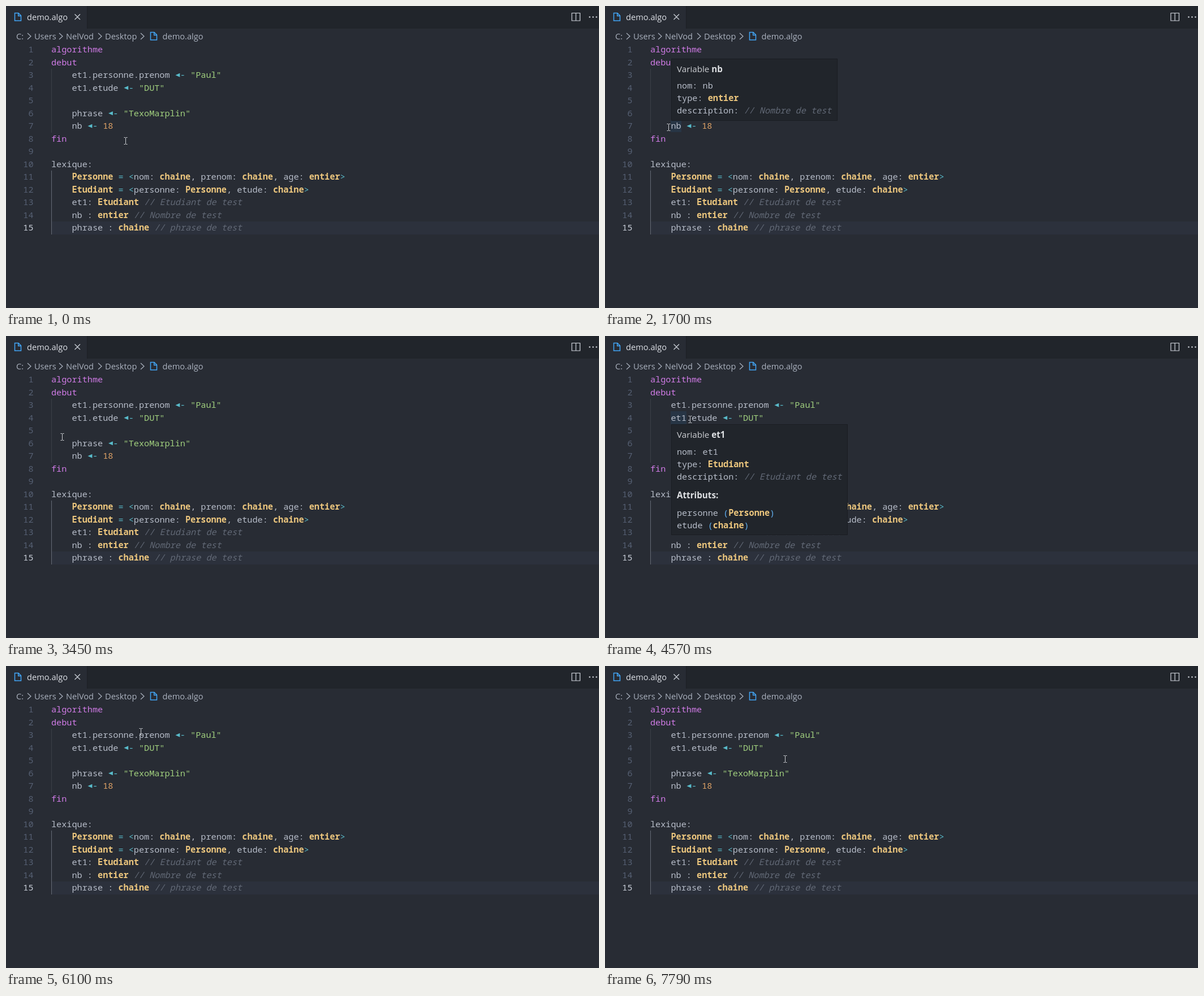
Animation of 1048x534 px, one loop 7.85 s. Source, as an HTML page:

```html
<!DOCTYPE html>
<html lang="fr">
<head>
<meta charset="utf-8">
<title>demo.algo</title>
<style>
html, body { margin: 0; width: 100%; height: 100%; overflow: hidden; background: #282c34; }
#stage {
  position: relative; width: 1048px; height: 534px; overflow: hidden; color: #b7bdc9;
  --mono: 500 15.19px "Noto Sans Mono", "DejaVu Sans Mono", monospace;
  --ui: "Open Sans", "Noto Sans", sans-serif;
  --loop: 7850ms step-end infinite;
}
#stage > * { position: absolute; }
pre { margin: 0; font: var(--mono); line-height: 22.5px; }
b { font-weight: 600; color: #edc77e; }
i { font-weight: 400; color: #626976; }
.k { color: #d07be6; }
.s { color: #a0cf7e; }
.n { color: #dfa266; }
.o { color: #59bccb; }
.p { color: #61afef; }
.arrow { color: #59bccb; }
.arrow::before {
  content: ""; display: inline-block; width: 9.1px; height: 7px; vertical-align: 1.5px;
  background: currentColor; clip-path: polygon(95% 0, 95% 100%, 8% 50%);
}

/* window chrome */
.tabs { left: 144px; top: 0; right: 0; height: 40px; background: #21252b; box-shadow: -1px 0 #1c1f25; }
.chrome { left: 0; top: 0; font: 14.6px var(--ui); fill: #abb2bf; }
.chrome .lit { fill: #dde0e6; }
.chrome g { fill: none; stroke: #d0d4dc; stroke-width: 1.2; }
.chrome .chevrons { stroke: #abb2bf; }
.chrome .file { stroke: #42a5f5; stroke-width: 1.5; }

/* editor */
.current { left: 80px; top: 381px; right: 0; height: 22.5px; background: #2c313c; }
.guide { left: 80px; width: 1px; height: 112.5px; top: 111px; background: #3b4048; }
.guide.active { top: 291px; background: #646a75; }
.numbers { left: 0; top: 65.3px; width: 48.6px; text-align: right; color: #566073; }
.numbers span { color: #c9ced8; }
.code { left: 80px; top: 65.3px; }
.word {
  left: calc(80px + 9.1px * var(--col)); top: calc(43.2px + 22.5px * var(--line));
  width: calc(9.1px * var(--len)); height: 22.5px; background: #273545;
}

/* hover cards */
.card {
  box-sizing: border-box; padding: 0 9px 6.5px; background: #21252b;
  border: 1px solid #1a1d22;
}
.card h4, .card h5 { margin: 0; font: 15.2px/34px var(--ui); color: #ccced2; white-space: pre; }
.card h4 { padding-bottom: 1.5px; }
.card h5 { line-height: 45px; margin-bottom: -3px; }
.card strong, .card h5 { font-weight: 700; color: #dfe1e4; }
.card pre { line-height: 22px; }

.nb { animation: nb var(--loop); }
.phrase { animation: phrase var(--loop); }
.et1 { animation: et1 var(--loop); }
.personne { animation: personne var(--loop); }
.prenom { animation: prenom var(--loop); }
@keyframes nb {
  0%, 24.968%, 100% { opacity: 0; } 7.898% { opacity: .6; } 8.662% { opacity: 1; }
}
@keyframes phrase {
  0%, 43.949%, 100% { opacity: 0; } 32.739% { opacity: .6; } 33.503% { opacity: 1; }
}
@keyframes et1 {
  0%, 61.529%, 100% { opacity: 0; } 50.955% { opacity: .6; } 51.72% { opacity: 1; }
}
@keyframes personne {
  0%, 77.707%, 100% { opacity: 0; } 67.006% { opacity: .6; } 67.898% { opacity: 1; }
}
@keyframes prenom {
  0%, 96.178%, 100% { opacity: 0; } 83.185% { opacity: .8; } 86.369% { opacity: 1; }
}

/* pointer: sampled moves between pauses */
.pointer { left: -3px; top: -6px; animation: pointer var(--loop); }
@keyframes pointer {
  0% { transform: translate(211px, 238px); }
  .892% { transform: translate(200px, 234px); animation-timing-function: steps(5); }
  4.777% { transform: translate(131px, 211px); }
  6.369% { transform: translate(129px, 211px); }
  15.159% { transform: translate(125px, 212px); }
  18.471% { transform: translate(119px, 213px); }
  21.656% { transform: translate(112px, 214px); }
  24.968% { transform: translate(104px, 208px); animation-timing-function: steps(3); }
  27.389% { transform: translate(108px, 196px); animation-timing-function: steps(3); }
  29.682% { transform: translate(136px, 190px); }
  37.325% { transform: translate(130px, 190px); }
  40.637% { transform: translate(106px, 184px); }
  43.949% { transform: translate(99px, 178px); animation-timing-function: steps(2); }
  45.478% { transform: translate(95px, 168px); animation-timing-function: steps(3); }
  47.898% { transform: translate(125px, 148px); }
  54.904% { transform: translate(135px, 148px); }
  58.217% { transform: translate(150px, 147px); }
  61.529% { transform: translate(168px, 140px); animation-timing-function: steps(3); }
  63.949% { transform: translate(188px, 129px); }
  67.898% { transform: translate(189px, 129px); }
  71.21% { transform: translate(213px, 121px); }
  74.522% { transform: translate(220px, 119px); }
  77.707% { transform: translate(238px, 116px); animation-timing-function: steps(2); }
  79.299% { transform: translate(265px, 122px); }
  89.682% { transform: translate(275px, 127px); }
  92.994% { transform: translate(299px, 144px); }
  96.178% { transform: translate(306px, 152px); animation-timing-function: steps(4); }
  99.236%, 100% { transform: translate(318px, 164px); }
}
</style>
</head>
<body>
<div id="stage">
  <div class="tabs"></div>
  <svg class="chrome" width="1048" height="66">
    <defs>
      <path id="file" d="M1 1H7.5L12 5.5V14.5H1ZM7.2 1.2V6H11.8"/>
      <path id="chevron" d="M0 0L6 5.5L0 11"/>
    </defs>
    <g class="file"><use href="#file" x="14.5" y="11.5"/><use href="#file" x="254.5" y="45.5"/></g>
    <g><path d="M121.5 14.5L131 24M131 14.5L121.5 24M1000 12.5H1014.5V26H1000ZM1007.2 12.5V26"/></g>
    <g class="chevrons">
      <use href="#chevron" x="38" y="48"/><use href="#chevron" x="94" y="48"/>
      <use href="#chevron" x="163" y="48"/><use href="#chevron" x="238" y="48"/>
    </g>
    <g stroke-linecap="round" style="stroke-width:2.6"><path d="M1031.5 19.5h.01M1037.5 19.5h.01M1043.5 19.5h.01"/></g>
    <text class="lit" x="37" y="24.5">demo.algo</text>
    <text x="18" y="59">C:</text>
    <text x="50" y="59">Users</text>
    <text x="106" y="59">NelVod</text>
    <text x="175" y="59">Desktop</text>
    <text x="276.5" y="59">demo.algo</text>
  </svg>

  <div class="current"></div>
  <div class="guide"></div>
  <div class="guide active"></div>
  <div class="word nb" style="--col:4; --len:2; --line:7"></div>
  <div class="word phrase" style="--col:4; --len:6; --line:6"></div>
  <div class="word et1" style="--col:4; --len:3; --line:4"></div>
  <div class="word personne" style="--col:8; --len:8; --line:3"></div>
  <div class="word prenom" style="--col:17; --len:6; --line:3"></div>

<pre class="numbers">1
2
3
4
5
6
7
8
9
10
11
12
13
14
<span>15</span></pre>
<pre class="code"><span class="k">algorithme</span>
<span class="k">debut</span>
    et1.personne.prenom <span class="arrow">-</span> <span class="s">"Paul"</span>
    et1.etude <span class="arrow">-</span> <span class="s">"DUT"</span>

    phrase <span class="arrow">-</span> <span class="s">"TexoMarplin"</span>
    nb <span class="arrow">-</span> <span class="n">18</span>
<span class="k">fin</span>

lexique:
    <b>Personne</b> <span class="o">=</span> <span class="o">&lt;</span>nom: <b>chaine</b>, prenom: <b>chaine</b>, age: <b>entier</b><span class="o">&gt;</span>
    <b>Etudiant</b> <span class="o">=</span> <span class="o">&lt;</span>personne: <b>Personne</b>, etude: <b>chaine</b><span class="o">&gt;</span>
    et1: <b>Etudiant</b> <i>// Etudiant de test</i>
    nb : <b>entier</b> <i>// Nombre de test</i>
    phrase : <b>chaine</b> <i>// phrase de test</i></pre>

  <div class="card nb" style="left:117px; top:92.5px; width:294px">
    <h4>Variable <strong>nb</strong></h4>
<pre>nom: nb
type: <b>entier</b>
description: <i>// Nombre de test</i></pre>
  </div>
  <div class="card phrase" style="left:117px; top:70px; width:294px">
    <h4>Variable <strong>phrase</strong></h4>
<pre>nom: phrase
type: <b>chaine</b>
description: <i>// phrase de test</i></pre>
  </div>
  <div class="card et1" style="left:117px; top:156px; width:312px">
    <h4>Variable <strong>et1</strong></h4>
<pre>nom: et1
type: <b>Etudiant</b>
description: <i>// Etudiant de test</i></pre>
    <h5>Attributs:</h5>
<pre>personne <span class="p">(</span><b>Personne</b><span class="p">)</span>
etude <span class="p">(</span><b>chaine</b><span class="p">)</span></pre>
  </div>
  <div class="card personne" style="left:153px; top:133.5px; width:158px">
    <h4>Attribut <strong>personne</strong></h4>
<pre>nom: personne
type: <b>Personne</b></pre>
    <h5>Attributs:</h5>
<pre>nom <span class="p">(</span><b>chaine</b><span class="p">)</span>
prenom <span class="p">(</span><b>chaine</b><span class="p">)</span>
age <span class="p">(</span><b>entier</b><span class="p">)</span></pre>
  </div>
  <div class="card prenom" style="left:235px; top:24px; width:143px">
    <h4>Attribut <strong>prenom</strong></h4>
<pre>nom: prenom
type: <b>chaine</b></pre>
  </div>

  <svg class="pointer" width="7" height="13" fill="none" stroke="#cdd0d4">
    <path d="M.5 .5H3M4 .5H6.5M3.5 1V12M.5 12.5H3M4 12.5H6.5"/>
  </svg>
</div>
</body>
</html>
```
